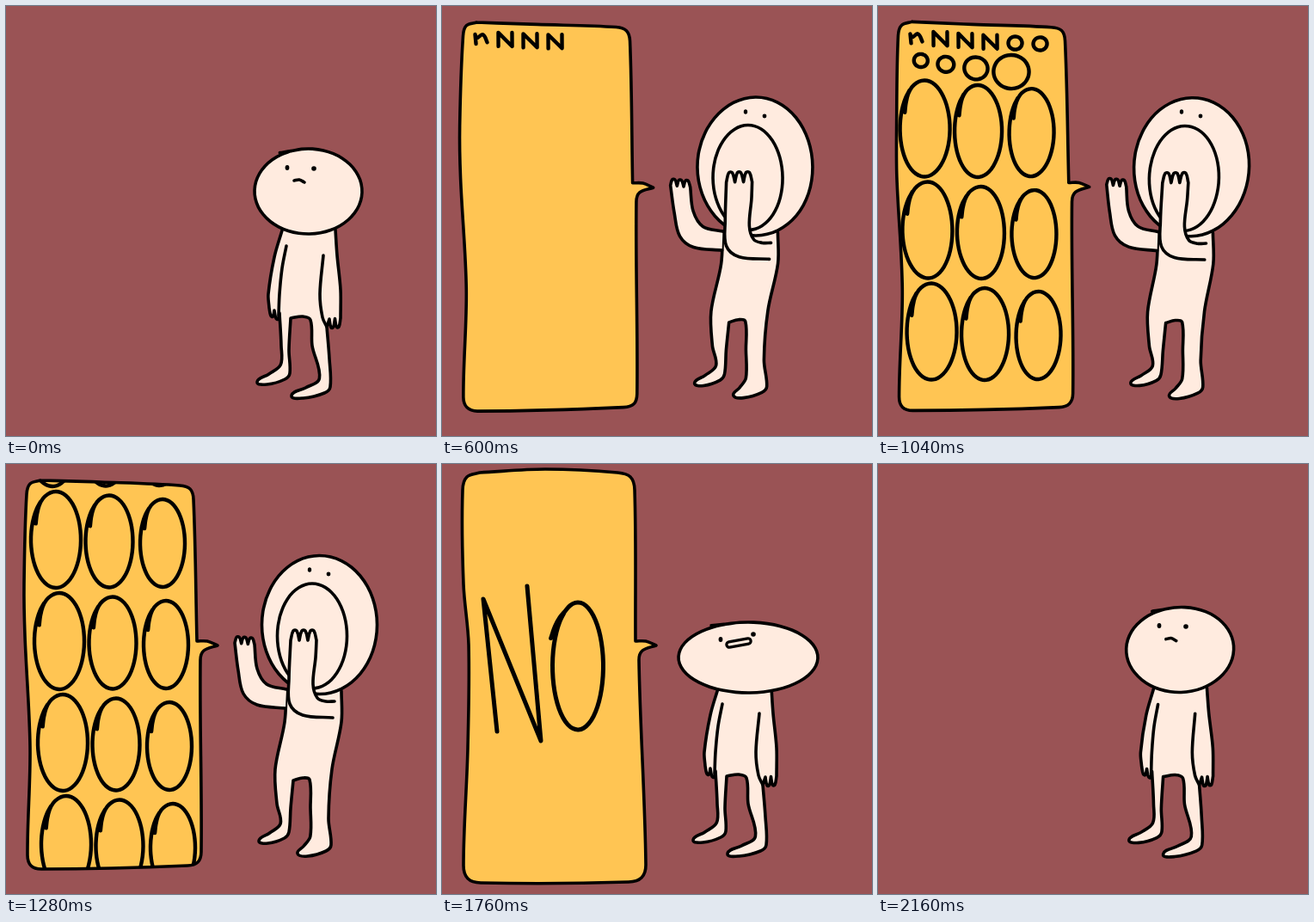
Write an HTML page with a canvas that moves like this. It is 500x500 px and loops after 2240 ms.

```html
<!DOCTYPE html>
<html lang="en">
<head>
<meta charset="utf-8">
<title>No</title>
<style>
html, body { margin: 0; width: 100%; height: 100%; overflow: hidden; background: #9a5355; }
canvas { display: block; width: 100vw; height: 100vh; }
</style>
</head>
<body>
<canvas id="stage" width="500" height="500"></canvas>
<script>
const ctx = document.getElementById("stage").getContext("2d");
const BG = "#9a5355", SKIN = "#ffebdf", YELLOW = "#ffc553";
const LOOP = 2240, SHOUT = 600, CALM_DOWN = 1760;
const LETTERS = 28, SCROLL_END = 790;
const clamp = (v, lo = 0, hi = 1) => Math.min(hi, Math.max(lo, v));
let boil = 0;

// Slow, smooth shift that makes the lines tremble.
const tremble = ([x, y]) => [
  x + 0.6 * Math.sin(y / 37 + boil * 2.1) * (boil > 0),
  y + 0.6 * Math.sin(x / 31 + boil * 1.7) * (boil > 0)
];

function spline(path, pts) {
  const along = (i, j) => {
    const a = pts[Math.max(0, i)], b = pts[Math.min(pts.length - 1, j)];
    const d = Math.hypot(b[0] - a[0], b[1] - a[1]) || 1;
    return [(b[0] - a[0]) / d, (b[1] - a[1]) / d];
  };
  for (let i = 0; i < pts.length - 1; i++) {
    const [p, q] = [pts[i], pts[i + 1]];
    const h = Math.hypot(q[0] - p[0], q[1] - p[1]) / 3;
    const [u, v] = [along(i - 1, i + 1), along(i, i + 2)];
    path.bezierCurveTo(p[0] + u[0] * h, p[1] + u[1] * h, q[0] - v[0] * h, q[1] - v[1] * h, ...q);
  }
}

// Smooth line through the points; "|" marks a sharp corner.
function curve(text) {
  const path = new Path2D();
  let last;
  for (const run of text.split("|")) {
    const nums = run.trim().split(/\s+/).map(Number);
    const pts = last ? [last] : [];
    for (let i = 0; i < nums.length; i += 2) pts.push(tremble([nums[i], nums[i + 1]]));
    if (!last) path.moveTo(...pts[0]);
    spline(path, pts);
    last = pts.at(-1);
  }
  return path;
}

// Hand-drawn ring: the pen starts inside (or outside) and overlaps its end.
function oval(cx, cy, rx, ry, inset = 0, from = -2.75) {
  const lead = Math.min(0.9, Math.abs(inset) * 4), sweep = 2 * Math.PI + lead;
  const pts = [], n = 32;
  for (let i = 0; i <= n; i++) {
    const a = sweep * i / n;
    const r = a < lead ? 1 - inset * (1 - a / lead) : 1;
    pts.push(tremble([cx + rx * r * Math.cos(from + a), cy + ry * r * Math.sin(from + a)]));
  }
  const path = new Path2D();
  path.moveTo(...pts[0]);
  spline(path, pts);
  return path;
}

function paint(path, fill, width = 3.6, ink = "#000") {
  if (fill) { ctx.fillStyle = fill; ctx.fill(path); }
  if (!width) return;
  ctx.strokeStyle = ink;
  ctx.lineWidth = width;
  ctx.stroke(path);
}

function dot(x, y, rx, ry) {
  ctx.fillStyle = "#000";
  ctx.beginPath();
  ctx.ellipse(x, y, rx, ry, 0, 0, 7);
  ctx.fill();
}

// Row of fingers between two knuckles; a negative length points up.
function fingers(x0, y0, x1, y1, n, len) {
  const at = (u, d) => `${x0 + (x1 - x0) * u} ${y0 + (y1 - y0) * u + d} `;
  let text = "";
  for (let i = 0; i < n; i++) {
    text += at((i + 0.3) / n, len) + at((i + 0.7) / n, len) + at((i + 1) / n, 0) + "| ";
  }
  return text;
}

// Foot pointing left, from the front of the ankle round to the heel.
function foot(x, y, len, ankle = 0.72) {
  const at = (u, d) => `${x + u * len} ${y + d} `;
  return at(ankle, -20) + at(ankle / 2, -9) + at(0, 0) + at(0.3, 3) + at(0.85, -3) + at(1, -10);
}

function drawCalm(k) {
  paint(curve(`321 261 312 292 305 335 306 351 | ${fingers(306, 351, 318, 357, 2, 8)}
    320 395 ${foot(292, 437, 38)} 329 400 331 363 | 345 361 354 365 356 395
    ${foot(332, 453, 45)} 376 410 373 373 | 376 364 | ${fingers(376, 364, 389, 363, 2, 10)}
    389 330 385 290 383 260`), SKIN);
  paint(curve("326 279 321 305 318 335 317 360"));
  paint(curve("369 290 365 335 368 362 373 373"));

  paint(oval(351.5 + 4.5 * k, 215.5 + 9.5 * k, 62.5 + 18.5 * k, 49.5 - 8.5 * k, -0.05, -2.1), SKIN);
  dot(327 - 3 * k, 188 + 16 * k, 2.4, 3);
  dot(358 + 4 * k, 189 + 9 * k * k, 2.8, 2.8);
  if (k < 0.2) return paint(curve("335 203 341 202 347 205"));
  const y = 6 * k;
  const lips = curve(`334 ${204 + y} 345 ${202 + y} 356 ${200 + y}`);
  paint(lips, null, 9.5);
  paint(lips, null, 3, SKIN);
}

function drawShout() {
  paint(curve(`326 262 324 300 313 355 315 395 ${foot(294, 438, 35)} 331 400 334 368
    | 345 365 353 367 354 400 ${foot(339, 453, 39, 0.38)} 375 412 379 355 390 300 390 264`), SKIN);
  paint(oval(364.5, 187, 67, 80.5), SKIN);
  paint(oval(356, 200, 40.5, 61), SKIN);
  dot(353, 123, 2.2, 2.8);
  dot(375, 128, 2.4, 2.4);
  paint(curve(`325 284 292 280 276 267 270 240 266 208
    | ${fingers(266, 208, 289, 210, 3, -7)} 292 238 303 256 326 262`), SKIN);
  paint(curve(`380 295 345 292 330 279 329 250 331 205
    | ${fingers(331, 205, 361, 205, 3, -11)} 360 225 357 256 362 272 372 276 382 276`), SKIN);
}

function bubbleShape([l, t], [r, t2], [r2, b], [l2, b2], round, side, top, left) {
  const c = round / 4;
  return curve(`${l + round} ${t} ${top} ${r - round} ${t2} ${r - c} ${t2 + c} ${r} ${t2 + round}
    ${side} 206 | ${side + 12} 206 ${side + 24} 211 | ${side + 8} 217 ${side + 4} 228
    ${r2} ${b - round} ${r2 - c} ${b - c} ${r2 - round} ${b}
    ${l2 + round} ${b2} ${l2 + c} ${b2 - c} ${l2} ${b2 - round}
    ${left} ${l} ${t + round} ${l + c} ${t + c} ${l + round} ${t}`);
}

// Six small letters, four growing ones, then rows of three tall rings.
function drawLetter(i) {
  if (i >= 10) {
    const col = (i - 10) % 3, row = Math.floor((i - 10) / 3);
    const x = 54 + 62 * col + 4 * row, y = 143 + 118 * row + 2 * col;
    return paint(oval(x, y, 29 - 1.5 * col, 56 - 2.5 * col, 0.13), null, 4.4);
  }
  const j = i - 6, big = j >= 0;
  const x = big ? 50 + 26 * j + 3 * j * j : 44 + 29 * i;
  const y = big ? 64 + 4 * j : 37 + 1.4 * i;
  const s = big ? 8 + 1.4 * j * j : 8;
  if (i > 3) paint(oval(x, y, s, s * 0.95), null, 4.4);
  else if (i > 0) paint(curve(`${x - s} ${y + s} | ${x - s} ${y - s} | ${x + s} ${y + s} | ${x + s} ${y - s}`), null, 4.4);
  else paint(curve(`${x - 5} ${y + 7} ${x - 6} ${y - 4} | ${x - 4} ${y} ${x + 3} ${y - 4} ${x + 8} ${y + 5}`), null, 4.4);
}

function drawWord(soft) {
  paint(curve(soft ? "64 311 48 157 | 115 322 | 99 142" : "63 316 54 166 | 118 313 | 95 134"), null, 5);
  paint(oval(158, 235, 29.5, soft ? 74 : 78, soft ? -0.15 : -0.3), null, 5);
}

function drawBubble(soft, count, scroll) {
  const shape = soft
    ? bubbleShape([24, 10], [224, 10], [237, 486], [25, 487], 20, 225, "120 6", "30 330 31 210 25 140")
    : bubbleShape([24, 19], [218, 25], [227, 467], [25, 471], 16, 222, "110 21", "28 330 22 200 21 140");
  paint(shape, YELLOW, 0);
  ctx.save();
  ctx.clip(shape);
  ctx.translate(0, -scroll);
  for (let i = 0; i < count; i++) drawLetter(i);
  ctx.translate(0, SCROLL_END);
  drawWord(soft);
  ctx.restore();
  paint(shape);
}

// Drawn on 80 ms holds, with faster passages on 40 ms.
function hold(t) {
  const fast = (t >= 560 && t < 640) || (t >= 1360 && t < 1720) || (t >= 1760 && t < 1920);
  const step = fast ? 40 : 80;
  return Math.floor(t / step) * step;
}

function render(time) {
  const t = hold(time % LOOP);
  const shouting = t >= SHOUT && t < CALM_DOWN;
  boil = t / 40 % 4;
  ctx.fillStyle = BG;
  ctx.fillRect(0, 0, 500, 500);
  ctx.lineCap = ctx.lineJoin = "round";

  if (t >= 320 && t < 1880) {
    const count = Math.ceil(Math.max((t - 320) / 80, 10 + (t - 800) * 3 / 80));
    const scroll = 173 * Math.max(0, (t - 1040) / 240) ** 2.2;
    drawBubble(!shouting, Math.min(LETTERS, count), Math.min(SCROLL_END, scroll));
  }
  if (shouting) drawShout();
  else drawCalm(t < SHOUT ? clamp((t - 220) / 320) : 1 - clamp((t - CALM_DOWN) / 240));
}

const start = performance.now();
function tick() {
  render(performance.now() - start);
  requestAnimationFrame(tick);
}
tick();
</script>
</body>
</html>
```
